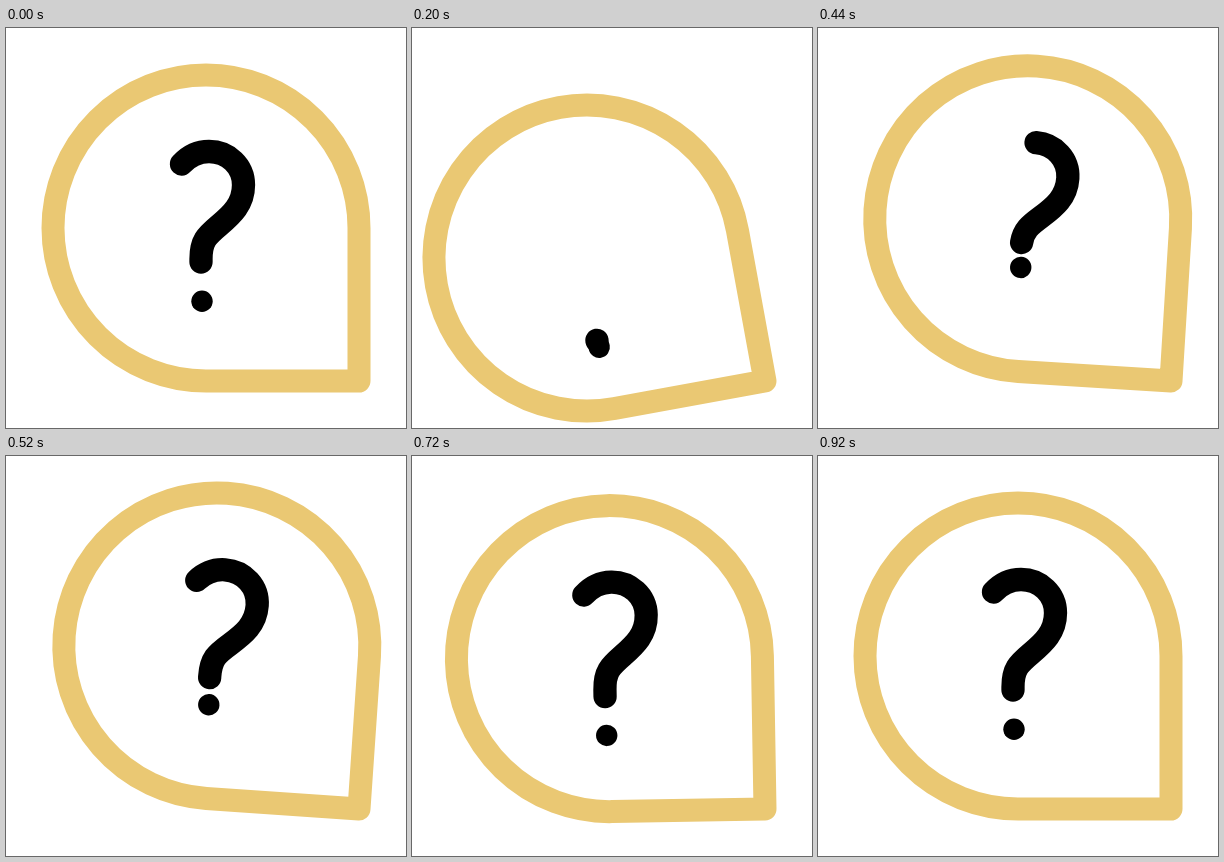
An HTML page for the animation above (1000 ms loop, 400 px wide and 400 px high).

```html
<!DOCTYPE html>
<html lang="en">
<head>
<meta charset="utf-8">
<title>Question bubble</title>
<style>
  html, body { margin: 0; width: 100%; height: 100%; overflow: hidden; background: #fff; }
  svg { display: block; width: 100%; height: 100%; }
  path { fill: none; stroke-linecap: round; stroke-linejoin: round; }
</style>
</head>
<body>
<svg viewBox="0 0 400 400">
  <g id="bubble">
    <path d="M353 353H200A153 153 0 1 1 353 200Z" stroke="#eac873" stroke-width="23"/>
    <path id="hook" stroke="#000" stroke-width="23.3"
      d="M195 300V231C195 213 200.5 208 213 197.5C226 186.5 237.5 176 237.5 157C237.5 138 222 123.5 203 123.5C191 123.5 182 129 175.5 136"/>
    <circle id="dot" cx="196" cy="273.2" r="10.7"/>
  </g>
</svg>
<script>
const LOOP = 1000, STEP = 40;
const bubble = document.getElementById('bubble');
const hook = document.getElementById('hook');
const dot = document.getElementById('dot');
const full = hook.getTotalLength();
const foot = 66; // path length hidden below the resting stem

const ease = u => u * u * (3 - 2 * u);

// Eases from 0 through [ms, value] turning points, then holds
function swing(t, from, ...points) {
  let t0 = 0, v0 = from;
  for (const [t1, v1] of points) {
    if (t < t1) return v0 + (v1 - v0) * ease((t - t0) / (t1 - t0));
    t0 = t1;
    v0 = v1;
  }
  return v0;
}

const tilt = t => swing(t, 0, [240, 11.2], [280, 11.2], [480, -5.25], [640, 3.25], [800, -1.3], [920, 0]);
const stem = t => swing(t, 0, [260, 57], [440, -10], [620, 9.5], [800, 0]);
const tip = t => swing(t, full, [180, 15], [520, full]);
const drop = t => swing(t, 0, [240, 18], [320, 18], [450, -25], [620, 5], [900, 0]);

function draw(now) {
  const t = Math.floor(now % LOOP / STEP) * STEP;
  const start = foot - stem(t);
  const length = Math.max(0.1, tip(t) - start);
  bubble.setAttribute('transform', `rotate(${-tilt(t)} 353 353)`);
  hook.setAttribute('stroke-dasharray', `${length} 999`);
  hook.setAttribute('stroke-dashoffset', -start);
  dot.setAttribute('cy', 273.2 + drop(t));
}

const begin = performance.now();
function tick() {
  draw(performance.now() - begin);
  requestAnimationFrame(tick);
}
draw(0);
requestAnimationFrame(tick);
</script>
</body>
</html>
```
